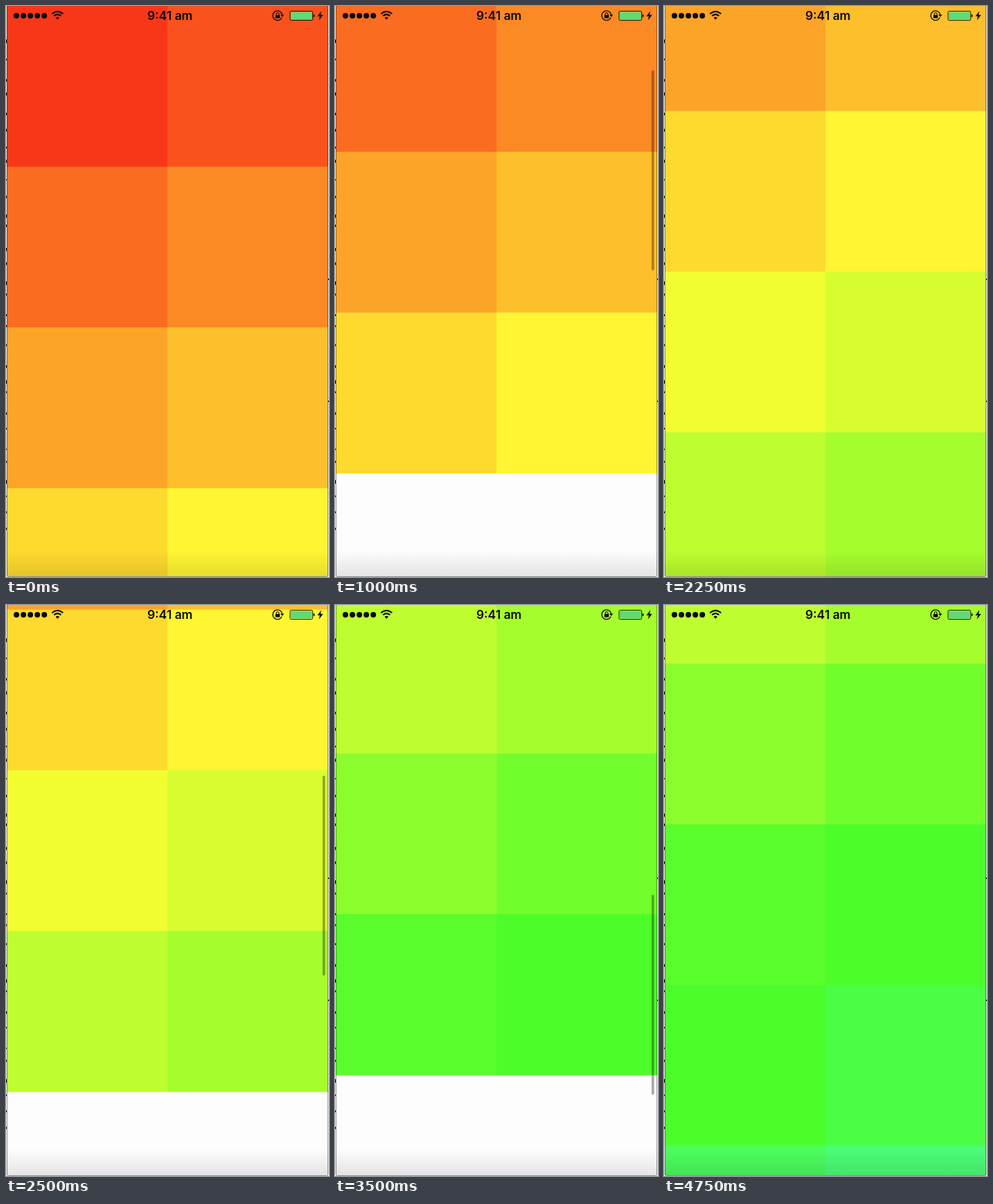
Recreate the animation shown at these times as an HTML page. Size 464x819 px, loop 5 s.

```html
<!DOCTYPE html>
<html lang="en">
<head>
<meta charset="utf-8">
<title>Colour grid</title>
<style>
  html, body { margin: 0; width: 100%; height: 100%; overflow: hidden; background: #fff; }
  svg { display: block; width: 100vw; height: 100vh; }
  .time { font: 600 17.4px Inter, Roboto, sans-serif; text-anchor: middle; }
</style>
</head>
<body>
<svg viewBox="0 0 464 819" preserveAspectRatio="none">
  <defs>
    <linearGradient id="shade" x1="0" y1="0" x2="0" y2="1">
      <stop offset="0" stop-opacity="0"/>
      <stop offset="1" stop-opacity=".1"/>
    </linearGradient>
    <clipPath id="screen"><rect x="1" width="462" height="818"/></clipPath>
  </defs>

  <rect width="464" height="819" fill="#fff"/>
  <g id="ticks" fill="#111"></g>

  <g clip-path="url(#screen)">
    <rect x="1" width="462" height="818" fill="#fdfdfd"/>
    <g id="grid"></g>
    <rect id="bar" x="454.8" width="3.6" height="287" rx="1.8" fill-opacity=".34"/>
    <rect x="1" y="780" width="462" height="38" fill="url(#shade)"/>
  </g>

  <path d="M1.5 0V816.5Q1.5 818.5 3.5 818.5H460.5Q462.5 818.5 462.5 816.5V0" fill="none" stroke="#000" stroke-opacity=".45"/>

  <g fill="#0b0b06">
    <g id="dots"></g>
    <g fill="none" stroke="#0b0b06" stroke-width="2.1">
      <path d="M66 11.2Q74 4.6 82 11.2"/>
      <path d="M68.9 14.3Q74 10 79.1 14.3"/>
    </g>
    <path d="M71.3 16.8Q74 14.7 76.7 16.8L74 19.8Z"/>
    <text class="time" x="235.5" y="20">9:41 am</text>

    <path d="M396.3 16.4A6.8 6.8 0 1 1 396.8 13" fill="none" stroke="#0b0b06" stroke-width="1.2"/>
    <path d="M394.2 12.4H399.6L396.9 15.8Z"/>
    <rect x="387" y="13" width="6.4" height="4.6" rx=".6"/>
    <path d="M388.3 13.2V11.6A1.9 1.9 0 0 1 392.1 11.6V13.2" fill="none" stroke="#0b0b06" stroke-width="1.1"/>

    <rect x="408" y="7.4" width="32.6" height="13.2" rx="1.8" fill="none" stroke="#0b0b06" stroke-width=".9"/>
    <rect x="409" y="8.4" width="30.6" height="11.2" rx=".8" fill="#5fda74"/>
    <path d="M441.6 11.8Q443.6 12.2 443.6 14T441.6 16.2Z"/>
    <path d="M453 7.2L447.3 14.7H450.8L449.6 20.6L455.6 12.7H451.9Z"/>
  </g>
</svg>

<script>
const NS = 'http://www.w3.org/2000/svg';
const LOOP = 5000, TICK = 250, ROW = 230.5, ROWS = 10;
const $ = id => document.getElementById(id);

const linear = p => p;
const easeIn = p => p * p;
const easeOut = p => 1 - (1 - p) ** 4;

// Flicks of the finger, in order: start, end, distance, easing
const FLICKS = [
  [700, 1250, 263, easeOut],
  [1250, 1750, 278, easeIn],
  [2250, 2750, 288, linear],
  [3000, 3500, 341, linear],
  [3500, 3750, 1, linear],
  [4250, 4500, 128, linear]
];
const LOADS = [2000, 3000, 4750]; // two more rows appear at each

function add(parent, tag, attrs) {
  const el = document.createElementNS(NS, tag);
  for (const k in attrs) el.setAttribute(k, attrs[k]);
  return parent.appendChild(el);
}

// Hue ramp: green rises to yellow, red falls to green, then blue rises
function color(i) {
  const r = Math.max(76, Math.min(248 + i, 443 - 25.3 * i));
  const g = Math.min(55 + 27.2 * i, 252.5);
  const b = Math.max(Math.min(25 + 3.7 * i, 57 - i), 25 * i - 356);
  return `rgb(${[r, g, b].map(Math.round)})`;
}

const cells = Array.from({ length: ROWS * 2 }, (_, i) => add($('grid'), 'rect', {
  x: i % 2 ? 232 : 1, y: (i >> 1) * ROW, width: 231, height: ROW + 0.5, fill: color(i)
}));

for (let i = 0; i < 5; i++) add($('dots'), 'circle', { cx: 15 + i * 10, cy: 14, r: 4 });

// Slivers of the window behind, at both edges
let seed = 7;
const random = () => (seed = seed * 16807 % 2147483647) / 2147483647;
for (let i = 0; i < 30; i++) {
  add($('ticks'), 'rect', { x: 0, y: 48 + i * 24 + random() * 12, width: 1, height: 1.5 + random() * 4 });
}
for (const y of [391, 566]) add($('ticks'), 'rect', { x: 463, y, width: 1, height: 2 });

function draw(now) {
  const t = Math.floor(now % LOOP / TICK) * TICK;
  let scroll = 0, bar = false;
  for (const [from, to, distance, ease] of FLICKS) {
    const p = Math.min(1, Math.max(0, (t - from) / (to - from)));
    scroll += distance * ease(p);
    bar ||= t > from && t < to + TICK;
  }
  const rows = 4 + 2 * LOADS.filter(at => t >= at).length;

  $('grid').setAttribute('transform', `translate(0 ${-scroll})`);
  cells.forEach((c, i) => c.setAttribute('visibility', i < rows * 2 ? 'visible' : 'hidden'));
  $('bar').setAttribute('y', 3.6 + scroll * 0.352);
  $('bar').setAttribute('visibility', bar ? 'visible' : 'hidden');
}

const start = performance.now();
function frame() {
  draw(performance.now() - start);
  requestAnimationFrame(frame);
}
frame();
</script>
</body>
</html>
```
